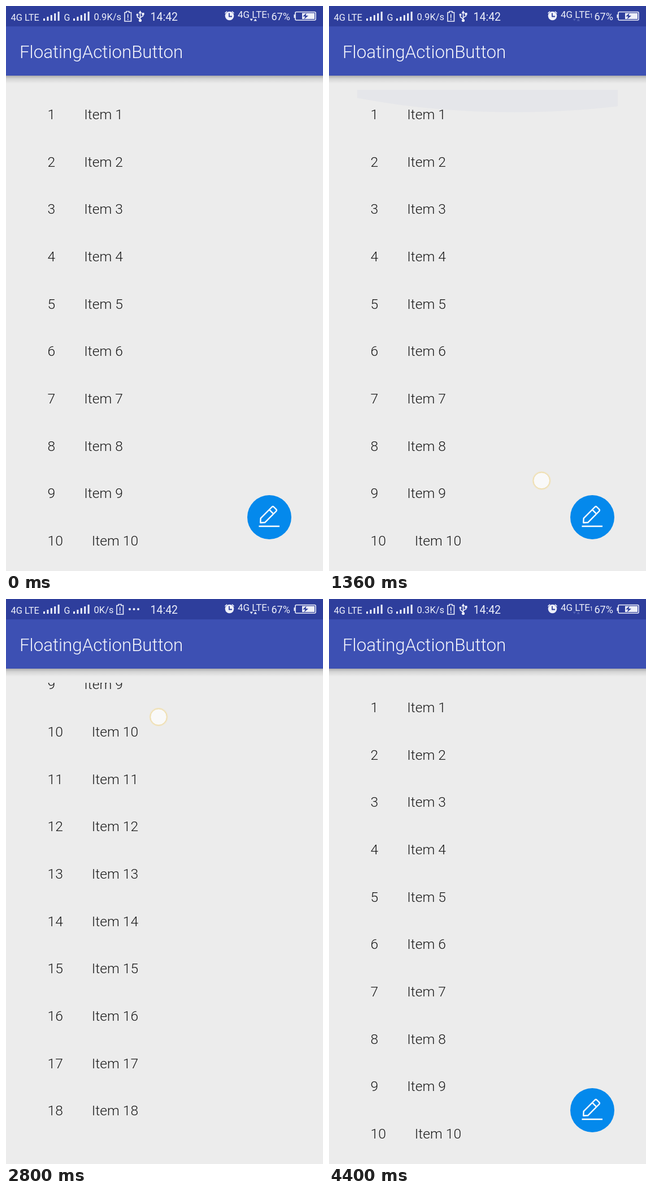
Recreate the animation shown at these times as an HTML page. Size 561x998 px, loop 5.04 s.

```html
<!DOCTYPE html>
<html lang="en">
<head>
<meta charset="utf-8">
<title>FloatingActionButton</title>
<style>
html, body { margin: 0; height: 100%; overflow: hidden; background: #ececec; }
svg { display: block; font-family: Roboto, "Liberation Sans", sans-serif; }
#rows { font-size: 24.6px; font-weight: 350; fill: #1a1a1a; }
#status { font-size: 16.5px; fill: #eef0fa; }
.line { fill: none; stroke: #eef0fa; stroke-width: 1.6; }
</style>
</head>
<body>
<svg width="561" height="998" viewBox="0 0 561 998">
  <defs>
    <linearGradient id="shade" x2="0" y2="1">
      <stop offset="0" stop-color="#000" stop-opacity=".27"/>
      <stop offset=".4" stop-color="#000" stop-opacity=".1"/>
      <stop offset="1" stop-color="#000" stop-opacity="0"/>
    </linearGradient>
    <clipPath id="list"><rect x="50" y="148" width="461" height="825"/></clipPath>
  </defs>
  <rect width="561" height="998" fill="#ececec"/>

  <g clip-path="url(#list)">
    <g id="rows"></g>
    <ellipse id="glow" rx="691" fill="#3f51b5"/>
    <g id="fab">
      <circle cx="466" cy="903" r="39" fill="#0489ec"/>
      <g fill="none" stroke="#fff" stroke-width="2.4" stroke-linejoin="round">
        <path d="M447.5 919H484"/>
        <path transform="translate(449.5 913.5) rotate(-45)"
          d="M1 0L7 -5.3H35q2.5 0 2.5 2.5V2.8q0 2.5 -2.5 2.5H7ZM28.5 -5.3V5.3"/>
      </g>
    </g>
  </g>

  <rect y="123" width="561" height="14" fill="url(#shade)"/>
  <rect width="561" height="123" fill="#3d50b3"/>
  <rect width="561" height="36" fill="#2e3e9c"/>
  <text x="24" y="91.5" font-size="31.3" font-weight="300" fill="#f6f7fc">FloatingActionButton</text>

  <g id="status">
    <text x="8.5" y="26">4G LTE</text>
    <text x="102.5" y="26" font-size="16">G</text>
    <g id="bars"></g>
    <text id="speed" x="155.5" y="24.5"></text>
    <path id="warn" class="line" d="M210 11.5H213V9.5H218V11.5H221.5V27H210ZM215.7 14.5V21M215.7 22.5V24.5"/>
    <g id="usb">
      <path class="line" d="M237.5 12V25M237.5 23L232.5 19.5V16M237.5 20.5L242.5 17.5V14"/>
      <path d="M237.5 8L240.5 13H234.5ZM240.5 12H244.5V16H240.5Z"/>
      <circle cx="232.5" cy="15.5" r="2"/><circle cx="237.5" cy="25.5" r="2.6"/>
    </g>
    <path id="dots" d="M219 18h0m7.5 0h0m7.5 0h0" stroke="#eef0fa" stroke-width="4" stroke-linecap="round"/>
    <text x="255.5" y="25.5" font-size="19.5">14:42</text>
    <circle cx="395.5" cy="17.5" r="7.8"/>
    <path class="line" d="M387.5 13L391 9.5M400 9.5L403.5 13"/>
    <path d="M395 12.5V18.5H400" fill="none" stroke="#2e3e9c" stroke-width="1.8"/>
    <text x="410" y="20.5" font-size="17">4G LTE</text>
    <text x="461.5" y="20.5" font-size="10">1</text>
    <path id="arrows" d="M431.5 22.5H437L434.2 26.5ZM438.5 26.5H444L441.2 22.5Z"/>
    <text x="469.5" y="25" font-size="18">67%</text>
    <rect class="line" x="512" y="10.5" width="36" height="14.5" rx="2"/>
    <path d="M509.5 15H511.5V21H509.5ZM524 12.5H546V23H524Z"/>
    <path d="M531.5 12.5L525 18.5H529.5L527.5 23.5L535 17H530.5Z" fill="#2e3e9c"/>
  </g>

  <g id="touch">
    <circle r="15.2" fill="none" stroke="#f3dfa8" stroke-width="2.4" opacity=".5"/>
    <circle r="14.4" fill="#f9f9f9" stroke="#efd99c"/>
  </g>
</svg>
<script>
const $ = id => document.getElementById(id);
const LOOP = 5040, STEP = 80, ROW = 83.67;

// Turning points of the drag: time, x, y
const turns = [
  [80, 375, 835], [800, 326, 302], [1430, 378, 857], [1840, 343, 275],
  [2480, 321, 921], [2800, 270, 208], [3120, 267, 220], [3540, 385, 925]
];
const flips = [160, 860, 1480, 1900, 2540, 3050]; // button hides, shows, hides...
const pulls = [1440, 2480, 3640]; // overscroll glow peaks

const ease = p => (p = Math.min(1, Math.max(0, p)), p * p * (3 - 2 * p));

function finger(t) {
  const i = Math.max(1, turns.findIndex(k => k[0] > t));
  const [a, b] = t < 3540 ? [turns[i - 1], turns[i]] : turns.slice(-2);
  const e = ease((t - a[0]) / (b[0] - a[0]));
  return [a[1] + (b[1] - a[1]) * e, a[2] + (b[2] - a[2]) * e];
}

// Each flip adds or takes back one full hide movement
const buttonShift = t =>
  flips.reduce((sum, f, i) => sum + (i % 2 ? -112 : 112) * ease((t - f) / 240), 0);

const glowPower = t =>
  Math.max(...pulls.map(p => ease(1 - (t < p ? (p - t) / 200 : (t - p) / 420))));

const show = (id, on) => $(id).style.display = on ? "" : "none";
const move = (id, x, y) => $(id).setAttribute("transform", `translate(${x} ${y})`);

let rows = "", bars = "";
for (let n = 1; n <= 30; n++) {
  const y = 200 + ROW * (n - 1);
  rows += `<text x="73.5" y="${y}">${n}</text>` +
    `<text x="${n > 9 ? 151.8 : 138.2}" y="${y}">Item ${n}</text>`;
}
for (const x of [66, 119])
  for (let i = 0; i < 5; i++)
    bars += `<rect x="${x + i * 6.4}" y="${22 - i * 3}" width="3" height="${4 + i * 3}"/>`;
$("rows").innerHTML = rows;
$("bars").innerHTML = bars;

function draw(t) {
  const [x, y] = finger(t);
  const grip = t < 1430 ? 835 : t < 2480 ? 857 : 918;
  move("rows", 0, Math.min(0, y - grip));
  move("touch", x, y + .4);
  show("touch", t >= 80 && t < 3640);
  move("fab", 0, buttonShift(t));

  const power = glowPower(t), g = $("glow");
  g.setAttribute("cx", 280.5 + (x - 280.5) / 2);
  g.setAttribute("cy", 148 - 598.4 * .66 * power);
  g.setAttribute("ry", 691 * .66 * power);
  g.setAttribute("opacity", .09 * power * power);

  const idle = t >= 1600 && t < 3600;
  $("speed").textContent =
    (t < 1600 ? "0.9" : idle ? "0" : t < 4320 ? "0.1" : "0.3") + "K/s";
  move("warn", idle ? -14 : 0, 0);
  show("usb", !idle);
  show("dots", idle);
  const active = t < 400 || t >= 2080 && t < 3600;
  $("arrows").setAttribute("fill", active ? "#eef0fa" : "#5262b4");
}

function tick() {
  draw(Math.floor(performance.now() % LOOP / STEP) * STEP);
  requestAnimationFrame(tick);
}
tick();
</script>
</body>
</html>
```
